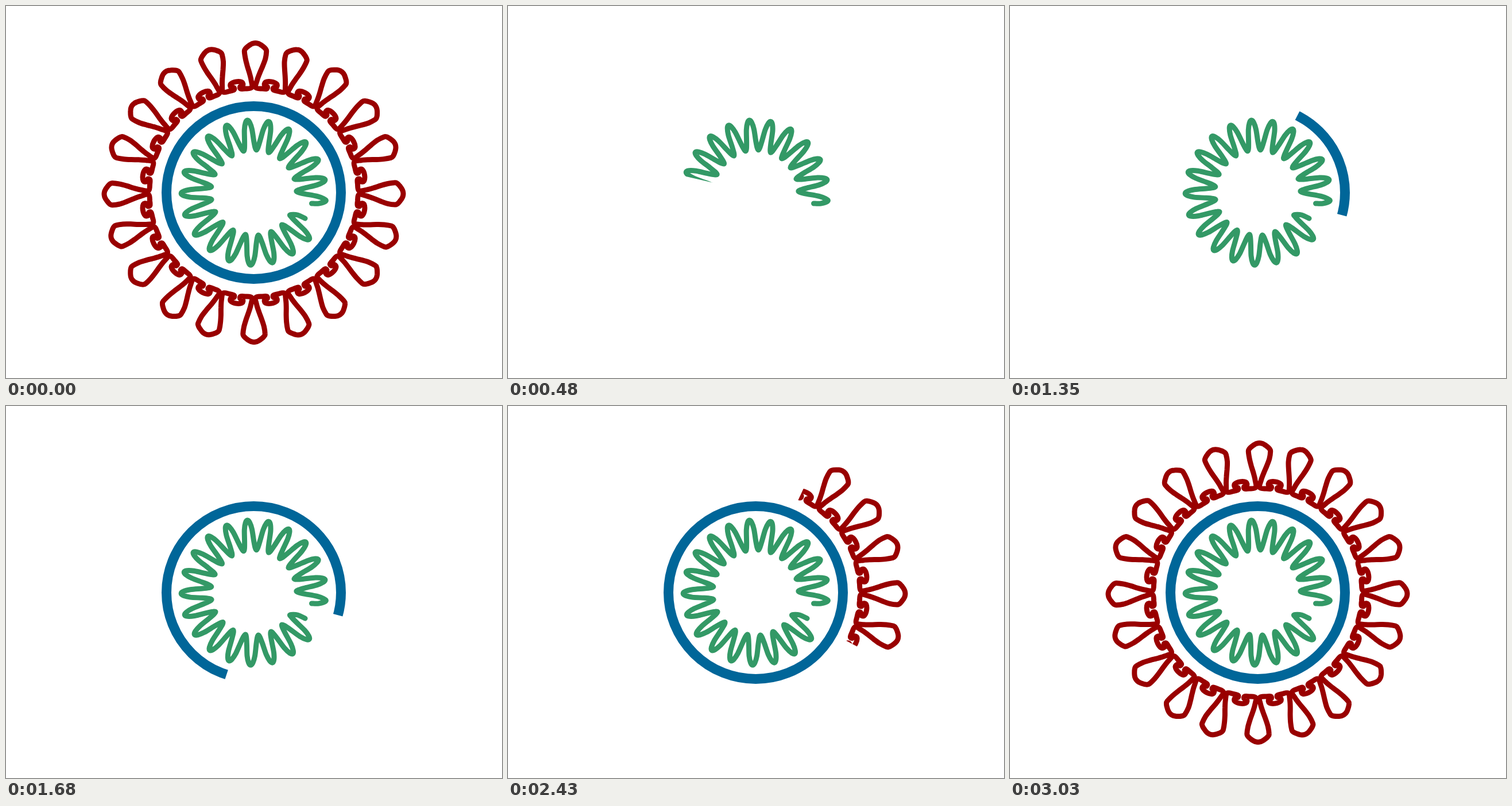
An HTML page for the animation above (3.6 s loop, 864x648 px).

```html
<!DOCTYPE html>
<html lang="en">
<head>
<meta charset="utf-8">
<title>Virus sketch</title>
<style>
  html, body { margin: 0; width: 100%; height: 100%; overflow: hidden; background: #fff; }
  svg { display: block; width: 100vw; height: 100vh; }
  path, ellipse { fill: none; stroke-linecap: round; stroke-linejoin: round; }
  clipPath path { fill: #000; }
  #coil { stroke: #396; stroke-width: 9; }
  #ring { stroke: #069; stroke-width: 17; }
  #spikes { stroke: #900; stroke-width: 9; }
</style>
</head>
<body>
<svg viewBox="0 0 864 648">
  <defs>
    <clipPath id="coilClip"><path/></clipPath>
    <clipPath id="ringClip"><path/></clipPath>
    <clipPath id="spikesClip"><path/></clipPath>
  </defs>
  <g clip-path="url(#coilClip)"><path id="coil"/></g>
  <g clip-path="url(#ringClip)"><ellipse id="ring" cx="431.5" cy="325" rx="152" ry="150.5"/></g>
  <g clip-path="url(#spikesClip)"><path id="spikes"/></g>
</svg>
<script>
const CX = 431.5, CY = 325, LOOP = 3600, STEP = 30, SWEEP = 900;
const $ = s => document.querySelector(s);
const { PI, sin, cos } = Math;
const rad = deg => deg * PI / 180;
const smooth = p => p * p * (3 - 2 * p);

// u: clockwise offset from the axis, v: distance from the centre.
// Degrees run counter-clockwise from the right.
function local(deg, u, v) {
  const c = cos(rad(deg)), s = sin(rad(deg));
  return [CX + v * c + u * s, CY - v * s + u * c];
}
const polar = (deg, r) => local(deg, 0, r);

// Smooth curve through all points.
function curve(pts, closed) {
  const n = pts.length;
  const at = i => closed ? pts[(i + n) % n] : pts[Math.max(0, Math.min(n - 1, i))];
  const fmt = (...ps) => ps.map(p => p[0].toFixed(1) + ' ' + p[1].toFixed(1)).join(',');
  let d = 'M' + fmt(pts[0]);
  for (let i = 0; i < n - (closed ? 0 : 1); i++) {
    const [a, b, c, e] = [at(i - 1), at(i), at(i + 1), at(i + 2)];
    d += 'C' + fmt([b[0] + (c[0] - a[0]) / 6, b[1] + (c[1] - a[1]) / 6],
                   [c[0] - (e[0] - b[0]) / 6, c[1] - (e[1] - b[1]) / 6], c);
  }
  return d + (closed ? 'Z' : '');
}

// A wave wound round the centre, with rounded crests and a short hook at each end.
function coilPath() {
  const pts = [[532.5, 344], [545, 344]];
  for (let i = 0; i <= 195; i++) {
    const n = i / 10, c = cos(2 * PI * n);
    const angle = -6.7 + 17.2 * n - 1.8 * sin(PI * n / 19.5);
    pts.push(polar(angle, 100.4 + 26 * Math.sign(c) * Math.abs(c) ** 0.8));
  }
  pts.push([508, 364], [521, 370]);
  return curve(pts);
}

// Right half of a spike, from the neck up to the middle of its lobed head.
function halfBulb() {
  const pts = [];
  for (let t = 0; t < 1; t += 0.2) pts.push([3.5 + 15.5 * smooth(t), 183 + 63 * t]);
  for (let a = 0; a < 90; a += 15) {
    const lobe = 1 + 0.05 * cos(rad(4 * a));
    pts.push([18.3 * lobe * cos(rad(a)), 246 + 13.8 * lobe * sin(rad(a))]);
  }
  return pts;
}

const mirror = (half, top) =>
  [...half.map(([u, v]) => [-u, v]), [0, top], ...[...half].reverse()];

function spikesPath() {
  const bulb = mirror(halfBulb(), 260.5);
  const knob = mirror([[14, 181], [6, 182], [5.5, 186], [10.5, 187.5], [10, 193]], 195.5);
  const pts = [];
  for (let i = 0; i < 20; i++) {
    const axis = 90 - 18 * i, lean = 3 * cos(rad(134 * i));
    for (const [u, v] of bulb) pts.push(local(axis, u + lean * Math.min(1, (v - 183) / 50), v));
    for (const [u, v] of knob) pts.push(local(axis - 9, u, v));
  }
  return curve(pts, true);
}

function wedge(from, part) {
  if (part <= 0) return 'M0 0';
  if (part >= 1) return 'M0 0H864V648H0Z';
  const [x1, y1] = polar(from, 600), [x2, y2] = polar(from + 360 * part, 600);
  return `M${CX} ${CY}L${x1} ${y1}A600 600 0 ${part > .5 ? 1 : 0} 0 ${x2} ${y2}Z`;
}

const layers = [
  { clip: $('#coilClip path'), begin: 15, from: -22 },
  { clip: $('#ringClip path'), begin: 1080, from: -15 },
  { clip: $('#spikesClip path'), begin: 2130, from: -28 }
];

function draw(now) {
  const t = Math.floor((now % LOOP) / STEP) * STEP;
  for (const { clip, begin, from } of layers) {
    const p = Math.max(0, Math.min(1, (t - begin) / SWEEP));
    // The finished picture is held over the loop's first step.
    clip.setAttribute('d', wedge(from, t === 0 ? 1 : smooth(p)));
  }
}

function tick() {
  draw(performance.now() - start);
  requestAnimationFrame(tick);
}

$('#coil').setAttribute('d', coilPath());
$('#spikes').setAttribute('d', spikesPath());
const start = performance.now();
tick();
</script>
</body>
</html>
```
